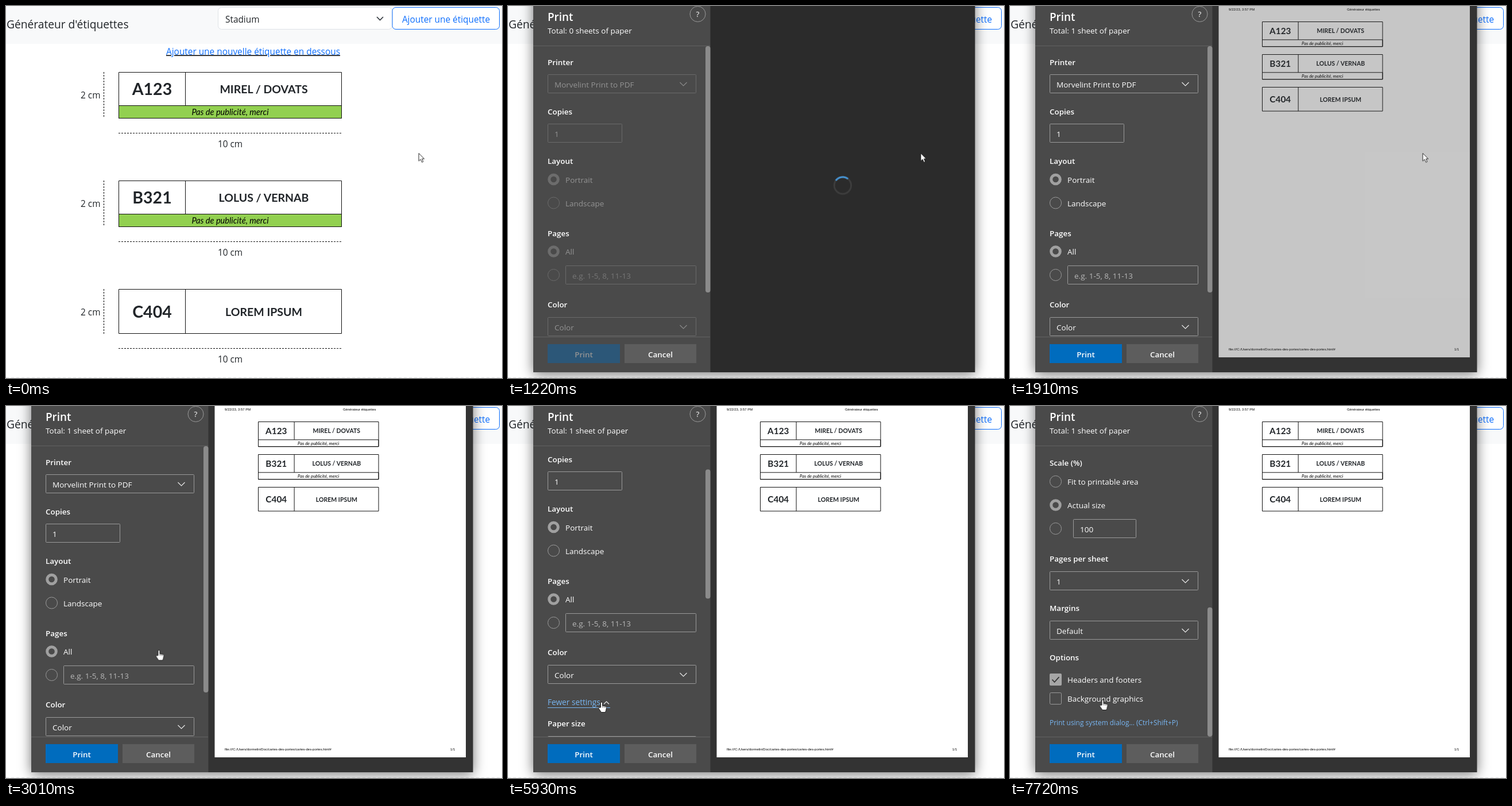
An HTML page that plays this animation: 864 by 648 pixels, repeating every 8 s.

```html
<!DOCTYPE html>
<html lang="fr">
<head>
<meta charset="utf-8">
<title>Générateur d'étiquettes</title>
<style>
@property --scroll { syntax: "<number>"; inherits: true; initial-value: 0; }

html, body { margin: 0; width: 100%; height: 100%; overflow: hidden; background: #fff; }
svg { display: block; width: 864px; height: 648px; }
text { font-family: "Open Sans", "Noto Sans", sans-serif; white-space: pre; }
.mid { text-anchor: middle; }

/* page */
.page text { font-size: 15.4px; fill: #212529; }
.page .title { font-size: 19.2px; }
.page .blue { fill: #0d6efd; }
.dash { stroke: #000; stroke-dasharray: 3 2; }
.tag path, .tag rect { fill: none; stroke: #111; vector-effect: non-scaling-stroke; }
.tag .strip { fill: var(--strip); }
.tag text { font-family: Lato, Carlito, sans-serif; font-weight: 700; text-anchor: middle; fill: #212529; }
.tag .code { font-size: 28.5px; }
.tag .name { font-size: 19.5px; }
.tag .note { font-size: 14.6px; font-weight: 400; font-style: italic; fill: #000; }

/* print dialog */
.dialog, .form, .loading, .ready, .closed, .open, .hover, .arrow, .hand { animation: 8s step-end infinite; }
.dialog { animation-name: dialog; }
.form { animation-name: form; }
.loading { animation-name: loading; }
.ready { animation-name: ready; }
.closed { animation-name: closed; }
.open { animation-name: open; }
.hover { animation-name: hover; }
.arrow { animation-name: arrow; }
.hand { animation-name: hand; }
.back { animation: back 8s linear infinite; filter: drop-shadow(0 3px 11px rgba(0, 0, 0, .55)); }
.dim { animation: dim 8s step-end infinite; }
.spin { animation: spin 8s linear infinite; }
.sheet { animation: sheet 8s linear infinite; --strip: none; }
.sheet > text { font: 5.95px "Liberation Sans", Arial, sans-serif; fill: #000; }
.form { --scroll: 0; }
.scroller { animation: scroll 8s linear infinite; }
.content { transform: translateY(calc(var(--scroll) * -1px)); }
.long { transform: translateY(calc(var(--scroll) * .8476px)); }
.short { transform: translateY(calc(var(--scroll) * .445px)); }
.cursor { animation: cursor 8s linear infinite; }

.form text { font-size: 13.5px; fill: #fff; }
.form .head { font-size: 13.4px; font-weight: 600; }
.form .big { font-size: 18.9px; font-weight: 600; }
.form .hint { fill: #b8b8b8; }
.form .link { font-size: 13.7px; fill: #78b6f2; }
.form .small { font-size: 11.9px; }
.box { fill: none; stroke: #9a9a9a; }
.on { fill: none; stroke: #a0a0a0; stroke-width: 5; }
.chev { fill: none; stroke: #e8e8e8; stroke-width: 1.2; }
.line { stroke: #78b6f2; }
.rule { stroke: #626262; }

@keyframes dialog { 0% { visibility: hidden } 5.875%, 100% { visibility: visible } }
@keyframes form { 0% { opacity: 0 } 15.25%, 100% { opacity: 1 } }
@keyframes loading { 0% { opacity: 0 } 15.25% { opacity: 1 } 21.25%, 100% { opacity: 0 } }
@keyframes ready { 0% { opacity: 0 } 21.25%, 100% { opacity: 1 } }
@keyframes dim { 0% { opacity: .4 } 21.25%, 100% { opacity: 1 } }
@keyframes closed { 0% { opacity: 1 } 72.375%, 100% { opacity: 0 } }
@keyframes open { 0% { opacity: 0 } 72.375%, 100% { opacity: 1 } }
@keyframes hover { 0% { opacity: 0 } 63.5%, 100% { opacity: 1 } }
@keyframes back {
  0%, 7.4% { fill: #3b3b3b }
  12.75%, 21.24% { fill: #2b2b2b }
  21.25%, 100% { fill: #333 }
}
@keyframes sheet { 0%, 21.25% { opacity: 0 } 23.875% { opacity: .72 } 24.75%, 100% { opacity: 1 } }
@keyframes spin { 0%, 15.25% { transform: rotate(-8deg) } 21.25%, 100% { transform: rotate(135deg) } }
@keyframes scroll {
  0%, 45.2% { --scroll: 0; animation-timing-function: ease-in-out }
  50.375%, 77.5% { --scroll: 91 }
  85.25% { --scroll: 366; animation-timing-function: ease-out }
  92%, 100% { --scroll: 631 }
}
@keyframes cursor {
  0%, 29% { transform: translate(719px, 256.5px); animation-timing-function: cubic-bezier(.4, 0, .75, .75) }
  37.625% { transform: translate(267px, 425px) }
  39.375% { transform: translate(188px, 491px) }
  40.125% { transform: translate(185.5px, 494px) }
  41.875%, 57.875% { transform: translate(195px, 498px); animation-timing-function: ease-in-out }
  68.25%, 76% { transform: translate(163px, 516px) }
  79%, 90% { transform: translate(172px, 516px); animation-timing-function: ease-in-out }
  96.5%, 100% { transform: translate(161.5px, 512px) }
}
@keyframes arrow {
  0% { opacity: 1 } 37.1% { opacity: 0 } 38.4% { opacity: 1 } 63.5% { opacity: 0 }
  78% { opacity: 1 } 93.5%, 100% { opacity: 0 }
}
@keyframes hand {
  0% { opacity: 0 } 37.1% { opacity: 1 } 38.4% { opacity: 0 } 63.5% { opacity: 1 }
  78% { opacity: 0 } 93.5%, 100% { opacity: 1 }
}
</style>
</head>
<body>
<svg id="stage" viewBox="0 0 864 648"></svg>
<script>
const text = (x, y, s, cls = "") => `<text x="${x}" y="${y}" class="${cls}">${s}</text>`;
const rect = (x, y, w, h, attrs) => `<rect x="${x}" y="${y}" width="${w}" height="${h}" ${attrs}/>`;
const group = (cls, ...parts) => `<g class="${cls}">${parts.join("")}</g>`;
const at = (x, y, body, scale = 1) => `<g transform="translate(${x} ${y}) scale(${scale})">${body}</g>`;

// labels, shared by the page and the print preview
const tag = (code, name, note) => group("tag",
  note ? rect(0, 58, 388, 22, 'class="strip"') : "",
  rect(0, 0, 388, note ? 80 : 77, ""),
  `<path d="M116 0V${note ? 58 : 77}"/>`,
  text(58, note ? 39.5 : 49.5, code, "code"),
  text(252.5, note ? 36.5 : 46.5, name, "name"),
  note ? text(194, 74.5, note, "note") : "");

const notice = "Pas de publicité, merci";
const tags = [
  tag("A123", "MIREL / DOVATS", notice),
  tag("B321", "LOLUS / VERNAB", notice),
  tag("C404", "LOREM IPSUM")
];

const measured = (body, i) => {
  const lift = i === 2 ? 3 : 0;
  return at(0, i * 189, at(196.5, 115.5, body) +
    `<path class="dash" d="M170.5 115V193M196 ${221.5 - lift}H585"/>` +
    text(130, 161, "2 cm") + text(390.5, 245.5 - lift, "10 cm", "mid"));
};

const page = group("page",
  rect(0, 0, 864, 66, 'fill="#f8f9fa"'),
  text(1, 38.5, "Générateur d'étiquettes", "title"),
  rect(369.5, 2.5, 303, 38, 'rx="6" fill="#fff" stroke="#dee2e6"'),
  text(382, 28.5, "Stadium"),
  '<path d="M646 19l5.5 5.5 5.5-5.5" fill="none" stroke="#343a40" stroke-width="1.7"/>',
  rect(673, 2.5, 186.5, 38, 'rx="6" fill="#fff" stroke="#0d6efd"'),
  text(766.5, 28.5, "Ajouter une étiquette", "mid blue"),
  '<g text-decoration="underline">' + text(430.5, 84.5, "Ajouter une nouvelle étiquette en dessous", "mid blue") + "</g>",
  `<g style="--strip:#92d050">${tags.map(measured).join("")}</g>`,
  '<path d="M0 647.5H864" stroke="#e3e5e7" stroke-dasharray="5 4"/>');

// form controls
const chevron = (x, y, r, flip = 1) => `<path class="chev" d="M${x - r} ${y - flip * r / 2}l${r} ${flip * r} ${r} ${-flip * r}"/>`;
const head = (y, s) => text(69, y + 5, s, "head");
const input = (x, y, w, s, cls) => rect(x + .5, y + .5, w - 1, 32, 'class="box" rx="1"') + text(x + 12, y + 22.5, s, cls);
const select = (y, s) => input(69, y, 259, s) + chevron(305.5, y + 17, 6);
const radio = (y, s, on) =>
  `<circle cx="79.5" cy="${y}" r="${on ? 7.8 : 10}" class="${on ? "on" : "box"}"/>` + text(100, y + 5.5, s);
const systemLink = y => text(69, y, "Print using system dialog... (Ctrl+Shift+P)", "link small");

const basics = head(97.5, "Printer") + head(184, "Copies") + head(270, "Layout") +
  head(396, "Pages") + head(520, "Color") +
  group("dim",
    select(119, "Morvelint Print to PDF"), input(69, 205, 130, "1"),
    radio(302, "Portrait", true), radio(343, "Landscape"),
    radio(427.5, "All", true), radio(468.5, ""), input(100, 452, 228, "e.g. 1-5, 8, 11-13", "hint"),
    select(542, "Color"));

const closed = group("closed",
  text(69, 612, "More settings", "link"), chevron(167.5, 609.5, 4.5),
  group("hover", '<path class="line" d="M69 616.5H172"/>'),
  systemLink(646.5));

const open = group("open",
  text(69, 611.5, "Fewer settings", "link"), chevron(171.5, 608, 4.5, -1),
  '<path class="line" d="M69 616.5H178"/>',
  head(644, "Paper size"), select(666, "A4"),
  head(730, "Scale (%)"),
  radio(762.5, "Fit to printable area"), radio(803.5, "Actual size", true), radio(844.5, ""),
  input(110, 828, 110, "100"),
  head(897, "Pages per sheet"), select(919, "1"),
  head(983, "Margins"), select(1005, "Default"),
  head(1069, "Options"),
  rect(69, 1097, 21, 21, 'rx="2" fill="#a6a6a6"'),
  '<path d="M73.5 1107.5l4 4.5 8-9" fill="none" stroke="#333" stroke-width="1.8"/>',
  text(100, 1113, "Headers and footers"),
  rect(69.5, 1130.5, 20, 20, 'rx="2" class="box"'),
  text(100, 1146, "Background graphics"),
  systemLink(1186.5));

const thumb = (cls, height) => rect(344, 70, 8.5, height, `class="${cls}" rx="4" fill="#8b8b8b"`);

const form = group("form",
  rect(44, -30, 308.5, 668, 'fill="#4a4a4a"'),
  text(69, 26, "Print", "big"),
  group("loading", text(69, 48, "Total: 0 sheets of paper")),
  group("ready", text(69, 48, "Total: 1 sheet of paper")),
  '<circle cx="330.5" cy="14" r="13.5" class="box"/>', text(330.5, 19, "?", "mid"),
  group("scroller",
    `<g clip-path="url(#view)">${group("content", basics, closed, open)}</g>`,
    group("closed", thumb("long", 429)), group("open", thumb("short", 225))),
  '<path class="rule" d="M44 69.5H352M44 576.5H352"/>',
  group("dim", rect(69, 589, 126, 33, 'fill="#006cbe"'), text(132, 612, "Print", "head mid")),
  rect(203, 589, 125, 33, 'fill="#5d5d5d"'), text(265.5, 612, "Cancel", "head mid"));

const spinner = group("loading", at(583, 312.5,
  '<circle r="14.7" fill="none" stroke="#3d3d3d" stroke-width="3"/>' +
  '<path class="spin" d="M-10.7-10A14.7 14.7 0 0 1 10.7-10" fill="none" stroke="#4593d3" stroke-width="3"/>'));

const sheet = group("sheet",
  rect(363.5, -10, 437.5, 622, 'fill="#fff"'),
  text(381, 8, "9/22/23, 3:57 PM"), text(587, 8, "Générateur étiquettes"),
  tags.map((body, i) => at(439.5, 27.5 + i * 57, body, .54)).join(""),
  text(381, 600, "file:///C:/Users/dormelin/Doc/cartes-des-portes/cartes-des-portes.html#"),
  text(774, 600, "1/1"));

const cursor = group("cursor",
  '<path class="arrow" d="M0 0V13.5L3.2 10.7 5.5 15.7 7.8 14.7 5.6 9.8H9.6Z" fill="#fff" stroke="#111" stroke-width=".9"/>',
  group("hand",
    '<path d="M-1.5 9V1.2a1.5 1.5 0 0 1 3 0V6l4.5.8c2 .4 2.8 1.2 2.6 3L7.5 14.5 6.5 17.5H-.5L-5 11c-1-1.6 1-2.6 2-1.6Z" fill="#fff" stroke="#111" stroke-width=".9"/>',
    '<path d="M1.5 6V9.5M4 6.7V9.7M6.3 7.2V10" stroke="#333" stroke-width=".7"/>'));

document.getElementById("stage").innerHTML =
  '<clipPath id="view"><rect x="44" y="70" width="309" height="506"/></clipPath>' +
  page +
  group("dialog", rect(44, -30, 769.5, 668, 'class="back"'), spinner, sheet, form) +
  cursor;
</script>
</body>
</html>
```
